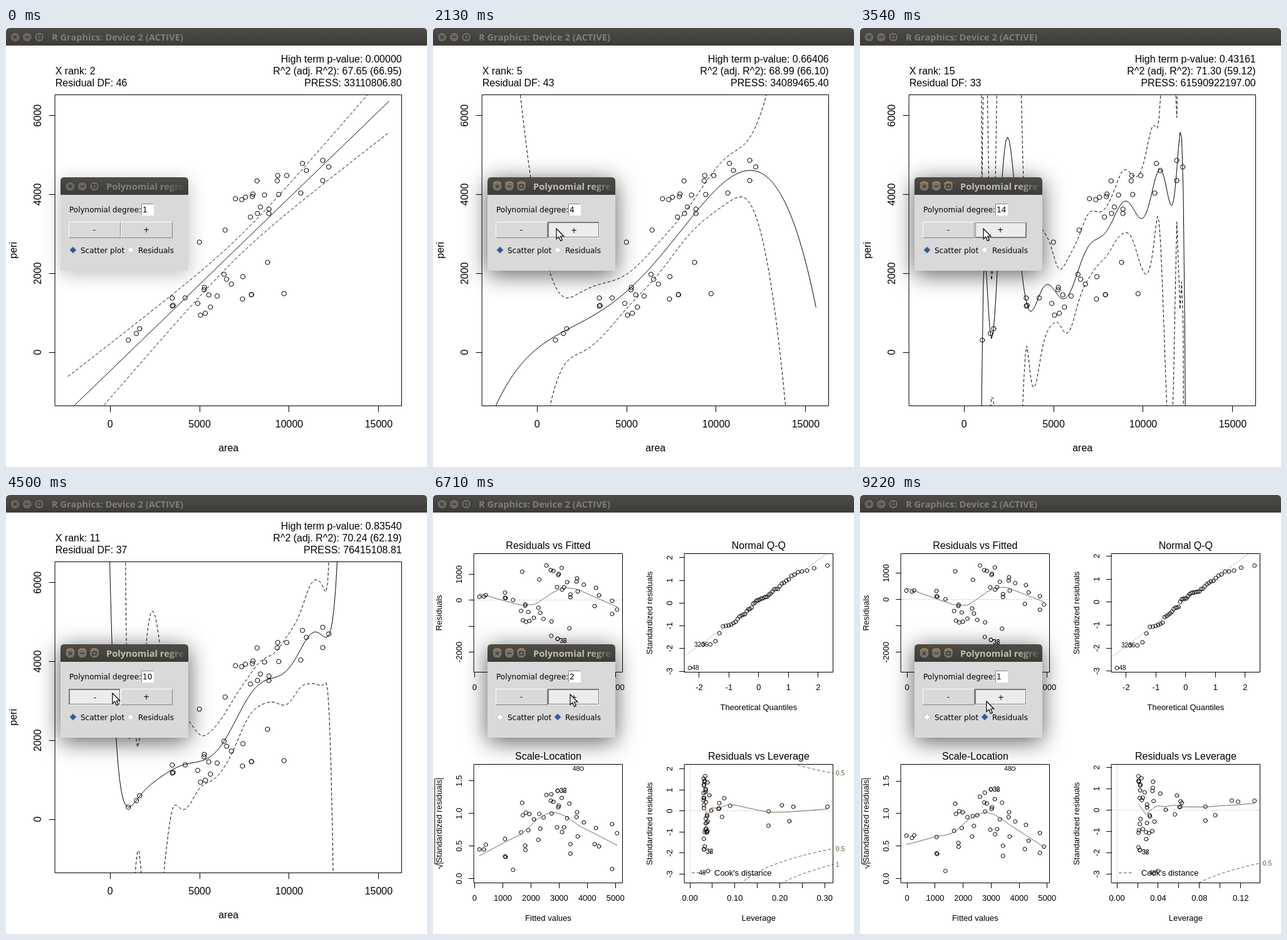
Recreate the animation shown at these times as an HTML page. Size 672 by 700 pixels, loop 9.24 s.

```html
<!DOCTYPE html>
<html lang="en">
<head>
<meta charset="utf-8">
<title>Polynomial regression</title>
<style>
html, body { margin: 0; width: 100%; height: 100%; overflow: hidden; background: #fff; }
#stage { position: relative; width: 672px; height: 700px; overflow: hidden; }
#stage > svg { position: absolute; left: 0; top: 0; }
text { font-family: "Liberation Sans", Arial, sans-serif; }
.line { fill: none; stroke: #000; stroke-linecap: round; stroke-linejoin: round; }
.dash { stroke-dasharray: 4 4; }
.dots { stroke-dasharray: 1 3; }
.smooth { stroke: #7d674b; }
.cook { stroke: #6b5637; }
.title { font: 700 14.67px "Open Sans", sans-serif; }
.ui { font: 12px "DejaVu Sans", sans-serif; }
#shadow { position: absolute; left: 87px; top: 238px; width: 204px; height: 149px;
  border-radius: 6px 6px 0 0; box-shadow: 0 6px 30px rgba(0,0,0,.25); }
#shadow.active { box-shadow: 0 6px 36px rgba(0,0,0,.64); }
</style>
</head>
<body>
<div id="stage">
  <svg id="plots" width="672" height="700"></svg>
  <div id="shadow"></div>
  <svg id="ui" width="672" height="700">
    <defs>
      <linearGradient id="bar" x2="0" y2="1"><stop stop-color="#4d4c46"/><stop offset="1" stop-color="#3c3b37"/></linearGradient>
      <linearGradient id="fade" gradientUnits="userSpaceOnUse" x1="250" x2="290" y1="0" y2="0">
        <stop stop-color="#c2bdb3"/><stop offset="1" stop-color="#45443f"/></linearGradient>
      <linearGradient id="fadeOff" gradientUnits="userSpaceOnUse" x1="250" x2="290" y1="0" y2="0">
        <stop stop-color="#807d77"/><stop offset="1" stop-color="#45443f"/></linearGradient>
    </defs>
    <path d="M0 28V6Q0 0 6 0H666Q672 0 672 6V28Z" fill="url(#bar)"/>
    <g id="mainDots"></g>
    <text class="title" x="73" y="20" fill="#807d77">R Graphics: Device 2 (ACTIVE)</text>
    <path d="M87 266V244Q87 238 93 238H285Q291 238 291 244V266Z" fill="url(#bar)"/>
    <g id="dlgDots"></g>
    <text id="dlgTitle" class="title" x="160" y="258">Polynomial regre</text>
    <rect x="87" y="266" width="204" height="121" fill="#d9d9d9"/>
    <text class="ui" x="101" y="294">Polynomial degree:</text>
    <rect x="216" y="280" width="20" height="19" fill="#fff"/>
    <path d="M216.5 298.5V280.5H235.5" fill="none" stroke="#828282"/>
    <text id="entry" class="ui" x="218" y="294"></text>
    <g id="minus"></g><g id="plus"></g>
    <path id="radioS" stroke="#b4b4b4" d="M101.5 354L107 348.5L112.5 354L107 359.5Z"/>
    <text class="ui" x="119" y="359">Scatter plot</text>
    <path id="radioR" stroke="#b4b4b4" d="M193.5 354L199 348.5L204.5 354L199 359.5Z"/>
    <text class="ui" x="211" y="359">Residuals</text>
    <path id="pointer" d="M0 0V16.5L3.8 13L6.6 19.4L9.3 18.2L6.5 12H11.8Z" fill="#fff" stroke="#000" stroke-width="1.2"/>
  </svg>
</div>
<script>
const $ = id => document.getElementById(id);

// R's "rock" data set
const area = [4990,7002,7558,7352,7943,7979,9333,8209,8393,6425,9364,8624,10651,8868,9417,8874,
  10962,10743,11878,9867,7838,11876,12212,8233,6360,4193,7416,5246,6509,4895,6775,7894,
  5980,5318,7392,7894,3469,1468,3524,5267,5048,1016,5605,8793,3475,1651,5514,9718];
const peri = [2791.90,3892.60,3930.66,3869.32,3948.54,4010.15,4345.75,4344.75,3682.04,3098.65,
  4480.05,3986.24,4036.54,3518.04,3999.37,3629.07,4608.66,4787.62,4864.22,4479.41,3428.74,
  4353.14,4697.65,3518.44,1977.39,1379.35,1916.24,1585.42,1851.21,1239.66,1728.14,1461.06,
  1426.76,990.388,1350.76,1461.06,1376.70,476.322,1189.46,1644.96,941.543,308.642,1145.69,
  2280.49,1174.11,597.808,1455.88,1485.58];
const n = area.length;

// ---- statistics ----
const sum = a => a.reduce((s, v) => s + v, 0);
const range = a => [Math.min(...a), Math.max(...a)];
const extend = ([a, b], f) => [a - f * (b - a), b + f * (b - a)];
const seq = (a, b, m) => Array.from({ length: m }, (_, i) => a + (b - a) * i / (m - 1));
const asc = (a, b) => a - b;

function integral(f, a, b, m = 200) {
  const h = (b - a) / m;
  let s = f(a) + f(b);
  for (let i = 1; i < m; i++) s += f(a + i * h) * (i % 2 ? 4 : 2);
  return s * h / 3;
}
function solve(f, lo, hi) {
  for (let i = 0; i < 50; i++) {
    const m = (lo + hi) / 2;
    if (f(m) > 0) lo = m; else hi = m;
  }
  return lo;
}
function tTail(t, df) {
  const f = a => Math.cos(a) ** (df - 1), end = Math.PI / 2;
  return integral(f, Math.atan(t / Math.sqrt(df)), end) / integral(f, 0, end);
}
const bell = x => Math.exp(-x * x / 2) / Math.sqrt(2 * Math.PI);
const qnorm = p => solve(x => p - 0.5 - integral(bell, 0, x), -6, 6);

// orthogonal polynomials over the data
const unit = x => (x - 6614) / 5598;
const alpha = [], norm = [], coef = [];
function basis(x, deg) {
  const p = [1], u = unit(x);
  for (let k = 0; k < deg; k++)
    p[k + 1] = (u - alpha[k]) * p[k] - (k ? norm[k] / norm[k - 1] * p[k - 1] : 0);
  return p;
}
for (let k = 0; k < 15; k++) {
  const col = area.map(a => basis(a, k)[k]);
  norm[k] = sum(col.map(c => c * c));
  alpha[k] = sum(col.map((c, i) => unit(area[i]) * c * c)) / norm[k];
  coef[k] = sum(col.map((c, i) => c * peri[i])) / norm[k];
}
function predict(x, deg) {
  const p = basis(x, deg);
  return [sum(p.map((v, k) => v * coef[k])), sum(p.map((v, k) => v * v / norm[k]))];
}
function model(deg) {
  const fits = area.map(a => predict(a, deg));
  const fit = fits.map(f => f[0]), lev = fits.map(f => f[1]);
  const res = peri.map((y, i) => y - fit[i]);
  const df = n - deg - 1, rss = sum(res.map(r => r * r)), s2 = rss / df;
  const std = res.map((r, i) => r / Math.sqrt(s2 * (1 - lev[i])));
  return { deg, fit, lev, res, df, rss, s2, std };
}

function lowess(xs, ys) {
  const order = xs.map((_, i) => i).sort((a, b) => xs[a] - xs[b]);
  const x = order.map(i => xs[i]), y = order.map(i => ys[i]);
  const span = x[n - 1] - x[0], ns = Math.floor(n * 2 / 3 + 1e-7), out = y.slice();
  let rw = x.map(() => 1);
  function local(i, l, r) {
    const h = Math.max(x[i] - x[l], x[r] - x[i]), w = [];
    for (let j = l; j < n; j++) {
      const d = Math.abs(x[j] - x[i]);
      if (d <= 0.999 * h) w.push([j, rw[j] * (d > 0.001 * h ? (1 - (d / h) ** 3) ** 3 : 1)]);
      else if (x[j] > x[i]) break;
    }
    const tot = sum(w.map(q => q[1]));
    if (tot <= 0) return y[i];
    const mean = sum(w.map(q => q[1] * x[q[0]])) / tot;
    const c = sum(w.map(q => q[1] * (x[q[0]] - mean) ** 2)) / tot;
    const b = Math.sqrt(c) > 0.001 * span ? (x[i] - mean) / c : 0;
    return sum(w.map(q => q[1] * (1 + b * (x[q[0]] - mean)) * y[q[0]])) / tot;
  }
  for (let it = 0; it < 4; it++) {
    let l = 0, r = ns - 1, last = -1, i = 0;
    while (last < n - 1) {
      if (r < n - 1 && x[i] - x[l] > x[r + 1] - x[i]) { l++; r++; continue; }
      out[i] = local(i, l, r);
      for (let j = last + 1; j < i; j++)
        out[j] = out[last] + (out[i] - out[last]) * (x[j] - x[last]) / (x[i] - x[last]);
      last = i;
      const cut = x[last] + 0.01 * span;
      for (i = last + 1; i < n && x[i] <= cut; i++)
        if (x[i] === x[last]) { out[i] = out[last]; last = i; }
      i = Math.max(last + 1, i - 1);
    }
    const dev = y.map((v, k) => Math.abs(v - out[k])), s = dev.slice().sort(asc);
    const mad = 3 * (s[n / 2 - 1] + s[n / 2]);
    rw = dev.map(d => d <= 0.001 * mad ? 1 : d <= 0.999 * mad ? (1 - (d / mad) ** 2) ** 2 : 0);
  }
  return x.map((v, i) => [v, out[i]]);
}

// ---- drawing ----
const TOP = 28, BOTTOM = 700;
const snap = v => Math.floor(v) + 0.5;
function text(x, y, str, size, anchor = "middle", turn = 0, fill = "#000") {
  return `<text transform="translate(${x.toFixed(2)} ${y.toFixed(2)}) rotate(${turn})" font-size="${size}" text-anchor="${anchor}" fill="${fill}">${str}</text>`;
}
const path = (d, cls = "", style = "") => `<path class="line ${cls}" d="${d}" style="${style}"/>`;

// Polyline cut at the device edge; dashes restart wherever it re-enters.
function polyline(pts) {
  let d = "", open = false;
  for (let i = 1; i < pts.length; i++) {
    const [x0, y0] = pts[i - 1], [x1, y1] = pts[i];
    const cut = y => {
      const e = Math.max(TOP, Math.min(BOTTOM, y));
      const x = e === y ? (y === y0 ? x0 : x1) : x0 + (x1 - x0) * (e - y0) / (y1 - y0);
      return x.toFixed(2) + " " + e.toFixed(2);
    };
    if (Math.max(y0, y1) < TOP || Math.min(y0, y1) > BOTTOM) { open = false; continue; }
    d += (open ? "" : "M" + cut(y0)) + "L" + cut(y1);
    open = y1 >= TOP && y1 <= BOTTOM;
  }
  return d;
}

function ticks([lo, hi]) {
  const cell = (hi - lo) / 5, base = 10 ** Math.floor(Math.log10(cell));
  let step = base;
  for (const [m, h] of [[2, 0.8], [5, 1.7], [10, 0.8]])
    if (m * base - cell < h * (cell - step)) step = m * base;
  const dec = Math.max(0, -Math.floor(Math.log10(step) + 1e-9)), list = [];
  for (let k = Math.ceil(lo / step); k * step <= hi; k++)
    list.push([k * step, (k * step + 0).toFixed(dec).replace(/^-(0\.?0*)$/, "$1")]);
  return list;
}

class Plot {
  constructor(l, t, r, b, xr, yr, size, line) {
    Object.assign(this, { l, t, r, b, size, line });
    this.xr = extend(xr, 0.04);
    this.yr = extend(yr, 0.04);
    this.dot = line * 0.1875;
    this.inner = this.outer = "";
  }
  X(v) { return this.l + (v - this.xr[0]) / (this.xr[1] - this.xr[0]) * (this.r - this.l); }
  Y(v) { return this.b - (v - this.yr[0]) / (this.yr[1] - this.yr[0]) * (this.b - this.t); }
  curve(pts, cls, style) {
    this.inner += path(polyline(pts.map(([x, y]) => [this.X(x), this.Y(y)])), cls, style);
  }
  points(xs, ys) {
    xs.forEach((x, i) => this.inner += `<circle class="line" cx="${this.X(x).toFixed(2)}" cy="${this.Y(ys[i]).toFixed(2)}" r="${this.dot}"/>`);
  }
  hline() { const y = snap(this.Y(0)); this.inner += path(`M${this.l} ${y}H${this.r}`, "dots", "stroke:#bebebe"); }
  vline() { const x = snap(this.X(0)); this.inner += path(`M${x} ${this.b}V${this.t}`, "dots", "stroke:#bebebe"); }
  tags(ids, xs, ys, shift) {
    const at = range(ids.map(i => xs[i])), mid = (at[0] + at[1]) / 2;
    for (const i of ids) {
      const left = xs[i] > mid, y = this.Y(ys[i]) + 3.6 + (shift && ys[i] < 0 ? 3 : 0);
      this.outer += text(this.X(xs[i]) + (left ? -3.3 : 3.3), y, i + 1, 10, left ? "end" : "start");
    }
  }
  axes(xlab, ylab) {
    const { l, r, t, b, line, size } = this;
    const width = s => sum([...s].map(c => c === "." ? 0.278 : c === "-" ? 0.333 : 0.556)) * line / 1.2;
    const gap = 0.833 * line / 1.2;
    let end = -1e9, d = `M${snap(l)} ${snap(t)}H${snap(r)}V${snap(b)}H${snap(l)}Z`;
    for (const [v, s] of ticks(this.xr)) {
      const x = this.X(v), w = width(s) / 2;
      d += `M${snap(x)} ${snap(b)}v${line / 2}`;
      if (x - w < end + gap) continue;
      end = x + w;
      this.outer += text(x, b + 1.8 * line, s, size);
    }
    end = -1e9;
    for (const [v, s] of ticks(this.yr)) {
      const y = this.Y(v), w = width(s) / 2;
      d += `M${snap(l)} ${snap(y)}h${-line / 2}`;
      if (-y - w < end + gap) continue;
      end = -y + w;
      this.outer += text(l - 1.2 * line, y, s, size, "middle", -90);
    }
    this.outer += path(d) + text((l + r) / 2, b + 3.8 * line, xlab, size);
    if (ylab) this.outer += text(l - 3.2 * line, (t + b) / 2, ylab, size, "middle", -90);
  }
  html() {
    const { l, t, r, b } = this, w = r - l, h = b - t;
    return `<svg x="${l}" y="${t}" width="${w}" height="${h}" viewBox="${l} ${t} ${w} ${h}">${this.inner}</svg>${this.outer}`;
  }
}

function scatter(deg) {
  const m = model(deg), xr = extend(range(area), 0.3), yr = extend(range(peri), 0.3);
  const p = new Plot(78.72, 106.72, 631.68, 602.08, xr, yr, 16, 19.2);
  const tq = solve(t => tTail(t, m.df) - 0.05, 0, 10);
  const rows = seq(...xr, 200).map(x => [x, ...predict(x, deg)]);
  const band = k => rows.map(([x, f, v]) => [x, f + k * tq * Math.sqrt(m.s2 * v)]);
  p.points(area, peri);
  p.curve(band(0));
  p.curve(band(-1), "dash");
  p.curve(band(1), "dash");
  p.axes("area", "peri");
  const mean = sum(peri) / n, tss = sum(peri.map(y => (y - mean) ** 2));
  const r2 = 1 - m.rss / tss, adj = 1 - (1 - r2) * (n - 1) / m.df;
  const press = sum(m.res.map((r, i) => (r / (1 - m.lev[i])) ** 2));
  const pv = tTail(Math.abs(coef[deg]) * Math.sqrt(norm[deg] / m.s2), m.df);
  const pct = v => (100 * v).toFixed(2);
  p.outer += text(p.l, 74.1, "X rank: " + (deg + 1), 16, "start")
    + text(p.l, 93.3, "Residual DF: " + m.df, 16, "start")
    + text(p.r, 54.9, "High term p-value: " + pv.toFixed(5), 16, "end")
    + text(p.r, 74.1, `R^2 (adj. R^2): ${pct(r2)} (${pct(adj)})`, 16, "end")
    + text(p.r, 93.3, "PRESS: " + press.toFixed(2), 16, "end");
  return p.html();
}

function residuals(deg) {
  const { fit, lev, res, std } = model(deg), rank = deg + 1;
  const panel = (col, row, title, xr, yr) => {
    const x = 336 * col, y = 28 + 336 * row;
    const p = new Plot(x + 65.3, y + 65.3, x + 302.5, y + 254.7, xr, yr, 13, 15.94);
    p.outer += text((p.l + p.r) / 2, p.t - 7.2, title, 16);
    return p;
  };
  const top3 = v => v.map((_, i) => i).sort((a, b) => Math.abs(v[b]) - Math.abs(v[a])).slice(0, 3);

  const a = panel(0, 0, "Residuals vs Fitted", range(fit), extend(range(res), 0.08));
  a.hline();
  a.points(fit, res);
  a.curve(lowess(fit, res), "smooth");
  a.tags(top3(res), fit, res, true);
  a.axes("Fitted values", "Residuals");

  const order = std.map((_, i) => i).sort((i, j) => std[i] - std[j]), q = [];
  order.forEach((id, k) => q[id] = qnorm((k + 0.5) / n));
  const [lo, hi] = range(std);
  const b = panel(1, 0, "Normal Q-Q", range(q), [lo, hi + 0.075 * (hi - lo)]);
  const sorted = order.map(i => std[i]);
  const quant = f => {
    const k = f * (n - 1), i = Math.floor(k);
    return sorted[i] + (k - i) * (sorted[i + 1] - sorted[i]);
  };
  const z = qnorm(0.75), slope = (quant(0.75) - quant(0.25)) / (2 * z), mid = (quant(0.75) + quant(0.25)) / 2;
  b.points(q, std);
  b.curve(b.xr.map(x => [x, mid + slope * x]), "dots", "stroke:#7f7f7f");
  b.tags(top3(std), q, std);
  b.axes("Theoretical Quantiles", "Standardized residuals");

  const root = std.map(v => Math.sqrt(Math.abs(v)));
  const c = panel(0, 1, "Scale-Location", range(fit), [0, Math.max(...root)]);
  c.points(fit, root);
  c.curve(lowess(fit, root), "smooth");
  c.tags(top3(std), fit, root);
  c.axes("Fitted values", "");
  c.outer += `<g transform="translate(14.3 ${(c.t + c.b) / 2}) rotate(-90)">`
    + text(4, 0, "Standardized residuals", 13)
    + path("M-72 -4l2 -1l2.5 6l3.5 -12.5H72M-63 2.5V-9.5M71.5 2.5V-9.5") + "</g>";

  const d = panel(1, 1, "Residuals vs Leverage", [0, Math.max(...lev)], extend(range(std), 0.08));
  const right = d.xr[1], levels = [0.5, 1];
  const bound = (crit, h) => Math.sqrt(crit * rank * (1 - h) / h);
  d.hline();
  d.vline();
  d.points(lev, std);
  d.curve(lowess(lev, std), "smooth");
  const hs = seq(Math.min(Math.min(...lev), Math.max(...lev) / 100), Math.min(right, 0.9999), 101);
  for (const crit of levels) for (const sign of [1, -1]) {
    d.curve(hs.map(h => [h, sign * bound(crit, h)]), "dash cook");
    const v = sign * bound(crit, Math.min(0.99, right));
    if (v > d.yr[0] && v < d.yr[1])
      d.outer += text(d.r + 4.2, d.Y(v) + 3.6, crit, 10.5, "start", 0, "#6b5637");
  }
  d.outer += path("M413.5 602.5H435", "dash cook") + text(449, 607, "Cook's distance", 13, "start");
  d.tags(top3(std.map((r, i) => r * r * lev[i] / (1 - lev[i]))), lev, std, true);
  d.axes("Leverage", "Standardized residuals");
  return a.html() + b.html() + c.html() + d.html();
}

const scenes = {};
function addScene(mode, deg) {
  const g = document.createElementNS("http://www.w3.org/2000/svg", "g");
  g.innerHTML = (mode === "s" ? scatter : residuals)(deg);
  g.style.display = "none";
  $("plots").append(g);
  scenes[mode + deg] = g;
}
for (let k = 1; k <= 14; k++) addScene("s", k);
for (let k = 1; k <= 6; k++) addScene("r", k);

// ---- window furniture ----
const titleDots = (x, y, on) => [0, 19.3, 38.6].map((dx, i) =>
  `<g transform="translate(${x + dx} ${y})"><circle r="7.8" fill="${on ? "#76736b" : "#68665f"}" stroke="#32312d"/>`
  + (on ? `<path d="M-6.5 -3.6A7.4 7.4 0 0 1 6.5 -3.6" fill="none" stroke="#c08a3e" stroke-width="1.4"/>` : "")
  + `<path d="${["M-2.5 -2.5L2.5 2.5M2.5 -2.5L-2.5 2.5", "M-3.5 0H3.5", "M-3 -2.5H3V2.5H-3Z"][i]}" fill="none" stroke="#35342f" stroke-width="1.4"/></g>`).join("");

function button(x, label, hover, focus, down) {
  const edge = down ? ["#828282", "#fff"] : ["#fff", "#828282"], o = down ? 1 : 0;
  return `<rect x="${x}" y="309" width="83" height="26" fill="${hover ? "#ececec" : "#d9d9d9"}"/>`
    + `<path d="M${x + .5} 334.5V309.5H${x + 82.5}" fill="none" stroke="${edge[0]}"/>`
    + `<path d="M${x + .5} 334.5H${x + 82.5}V309.5" fill="none" stroke="${edge[1]}"/>`
    + (focus ? `<rect x="${x + 1.5}" y="310.5" width="80" height="23" fill="none" stroke="#000" stroke-dasharray="1 1"/>` : "")
    + `<text class="ui" x="${x + 41 + o}" y="${326 + o}" text-anchor="middle">${label}</text>`;
}
$("mainDots").innerHTML = titleDots(14.5, 14.5, false);

// ---- timeline ----
// A button sinks PRESS ms before the plot changes; the entry follows, and the button rises, LAG ms after.
const LOOP = 9240, ACTIVE = 1500, PRESS = 100, LAG = { s: 25, r: 70 };
const clicks = [];
function run(mode, key, start, step, from, to) {
  const dir = Math.sign(to - from) || 1;
  for (let k = 0; k <= Math.abs(to - from); k++)
    clicks.push({ t: start + k * step, mode, key, deg: from + k * dir });
}
run("s", "", -PRESS, 0, 1, 1);
run("s", "+", 1600, 245, 2, 4);
run("s", "+", 2222, 141, 5, 14);
run("s", "-", 3940, 145, 13, 4);
run("s", "-", 5385, 146, 3, 1);
run("r", "r", 6060, 0, 1, 1);
run("r", "+", 6520, 0, 2, 2);
run("r", "+", 6805, 190, 3, 6);
run("r", "-", 7780, 280, 5, 1);
run("r", "+", 9280, 0, 2, 2);

const moves = [[980, 606, 470], [1300, 197, 320], [3620, 197, 320], [3820, 170, 316],
  [5760, 170, 316], [5960, 203, 352], [6200, 203, 352], [6380, 219, 318],
  [7460, 219, 318], [7660, 152, 321], [9060, 152, 321], [9220, 202, 329]];
function pointerAt(t) {
  if (t < moves[0][0]) return null;
  t = Math.floor((t - 20) / 40) * 40 + 20;
  const i = moves.findIndex(m => m[0] > t);
  if (i < 0) return moves[moves.length - 1].slice(1);
  const [t0, x0, y0] = moves[i - 1], [t1, x1, y1] = moves[i];
  const u = (t - t0) / (t1 - t0), e = u * u * (3 - 2 * u);
  return [Math.round(x0 + (x1 - x0) * e), Math.round(y0 + (y1 - y0) * e)];
}

let shown, key;
function render(t) {
  const latest = delay => clicks.filter(c => c.t + delay(c) <= t).pop();
  const plot = latest(() => 0), settled = latest(c => LAG[c.mode]), pressed = latest(() => -PRESS);
  const at = pointerAt(t), active = t >= ACTIVE, focus = pressed.key, down = pressed !== settled;
  const over = x => at && at[0] >= x && at[0] < x + 83 && at[1] >= 309 && at[1] < 335;
  $("pointer").style.display = at ? "" : "none";
  if (at) $("pointer").setAttribute("transform", `translate(${at[0]} ${at[1]})`);

  const next = [plot.mode, plot.deg, settled.deg, focus, active, down, over(100), over(183)].join();
  if (next === key) return;
  key = next;
  if (shown) shown.style.display = "none";
  shown = scenes[plot.mode + plot.deg];
  shown.style.display = "";
  $("shadow").className = active ? "active" : "";
  $("dlgDots").innerHTML = titleDots(102.5, 252.5, active);
  $("dlgTitle").setAttribute("fill", active ? "url(#fade)" : "url(#fadeOff)");
  $("entry").textContent = settled.deg;
  $("minus").innerHTML = button(100, "-", over(100), focus === "-", down && focus === "-");
  $("plus").innerHTML = button(183, "+", over(183), focus === "+", down && focus === "+");
  $("radioS").setAttribute("fill", plot.mode === "s" ? "#2b5c9e" : "#fff");
  $("radioR").setAttribute("fill", plot.mode === "r" ? "#2b5c9e" : "#fff");
}

const begin = performance.now();
function tick() {
  render((performance.now() - begin) % LOOP);
  requestAnimationFrame(tick);
}
tick();
</script>
</body>
</html>
```
